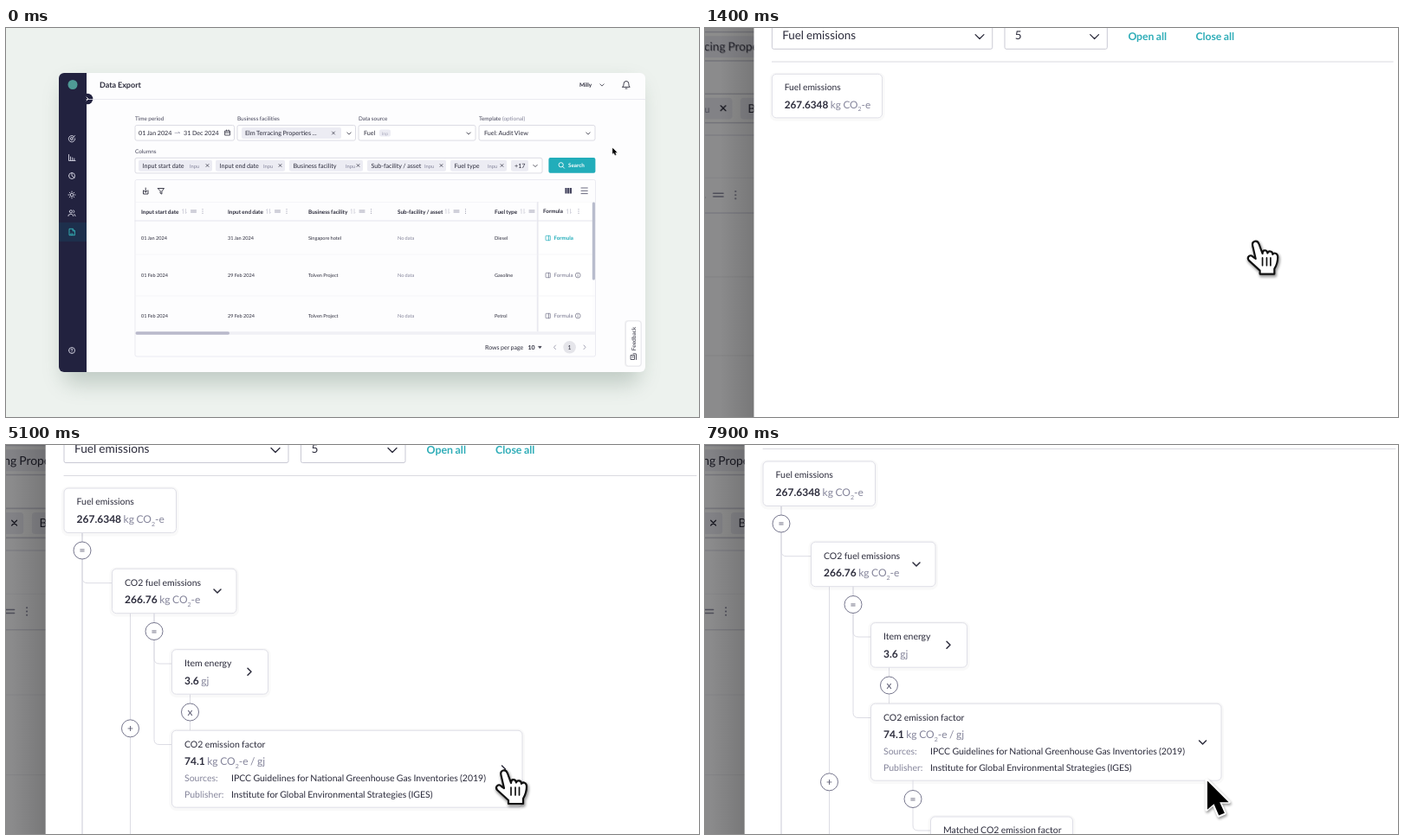
An HTML page that plays this animation: 800x450 px, repeating every 8 s.

```html
<!DOCTYPE html>
<html lang="en">
<head>
<meta charset="utf-8">
<title>Data export walkthrough</title>
<style>
html, body { margin: 0; width: 100%; height: 100%; overflow: hidden; background: #edf2ee }
svg { display: block; width: 800px; height: 450px; font-family: Lato, "Open Sans", sans-serif; text-rendering: geometricPrecision }
text { white-space: pre; word-spacing: -.04em }
</style>
</head>
<body>
<svg id="stage" viewBox="0 0 800 450"></svg>
<script>
const NAVY = '#22223f', INK = '#2c2c3c', GREY = '#85859b', PALE = '#dcdce4', TEAL = '#22adba';
const LOOP = 8000, ZOOM = 1.93, FOCUS = [646.5, 233];

// ---- drawing helpers, each returns markup ----
const text = (x, y, size, str, fill = INK, more = '') =>
  `<text x="${x}" y="${y}" font-size="${size}" fill="${fill}" ${more}>${str}</text>`;
const bold = (x, y, size, str, fill = INK, more = '') => text(x, y, size, str, fill, 'font-weight="700" ' + more);
const rect = (x, y, w, h, r, fill, stroke = 'none', more = '') =>
  `<rect x="${x}" y="${y}" width="${w}" height="${h}" rx="${r}" fill="${fill}" stroke="${stroke}" ${more}/>`;
const path = (d, stroke, w = 1, fill = 'none', more = '') =>
  `<path d="${d}" fill="${fill}" stroke="${stroke}" stroke-width="${w}" stroke-linecap="round" stroke-linejoin="round" ${more}/>`;
const circle = (x, y, r, fill, stroke = 'none', w = 1) =>
  `<circle cx="${x}" cy="${y}" r="${r}" fill="${fill}" stroke="${stroke}" stroke-width="${w}"/>`;
const group = (body, transform = '', opacity = 1) => `<g transform="${transform}" opacity="${opacity}">${body}</g>`;
const at = (x, y, body) => group(body, `translate(${x} ${y})`);
const middle = 'text-anchor="middle"';
const down = (x, y, s = 2.2, w = .8) => path(`M${x - s} ${y - s / 2}l${s} ${s}l${s} ${-s}`, INK, w);
const cross = (x, y) => path(`M${x - 1.5} ${y - 1.5}l3 3m0-3l-3 3`, INK, .7);

// ---- page behind the panel ----
function sidebar() {
  const icon = (y, d, colour = '#d9d9e6') => at(76, y, path(d, colour, .9));
  const ring = 'M-3.5 0a3.5 3.5 0 1 0 7 0a3.5 3.5 0 1 0 -7 0';
  return path('M93 52H67a6 6 0 0 0-6 6V392a6 6 0 0 0 6 6H93Z', 'none', 0, NAVY) +
    rect(61, 225, 32, 22, 0, '#1d2f4c') + circle(77, 65.5, 5.5, '#4f9a96') +
    circle(94, 82, 6.3, NAVY) + path('M93 80l2 2l-2 2', '#fff', .9) +
    icon(128, 'M3 -2a3.7 3.7 0 1 0 .7 2M1.6 0a1.6 1.6 0 1 1-1.6-1.6M0 0L3.5-3.5') +
    icon(150, 'M-3.5-3.5V3.5H4M-1.5 3V-1M.7 3V0M2.8 3V1') +
    icon(171, ring + 'M0-3.5V0L3 2') +
    icon(193, 'M-1.8 0a1.8 1.8 0 1 0 3.6 0a1.8 1.8 0 1 0-3.6 0M0-4v1M0 3v1M-4 0h1M3 0h1M-2.8-2.8l.6.6M2.2 2.2l.6.6M2.8-2.8l-.6.6M-2.2 2.2l-.6.6') +
    icon(214, 'M-2.7-1.7a1.6 1.6 0 1 0 3.2 0a1.6 1.6 0 1 0-3.2 0M-4 3.5V2.4Q-1-.2 1.6 2.4V3.5M2-3.3q2 1.6 0 3.2M3 1.5l1 2') +
    icon(236, 'M1-3.7H-3V3.7H3.4V-1.2L1-3.7V-1.2H3.4M-1 1.6a1.2 1.2 0 1 0 2 0', '#36b9bd') +
    icon(373, ring + 'M-1-1q.2-1 1.1-.9q1.2.4.5 1.3q-.6.3-.6 1M0 1.9v.1');
}

function filters() {
  const box = (x, w, y = 112.5) => rect(x, y, w, 17.6, 2, '#fff', '#d3d3de', 'stroke-width=".8"');
  const chip = (x, w, y) => rect(x, y, w, 13, 2, '#ececf3');
  const label = (x, y, s) => text(x, y, 6.4, s, '#45455a');
  const columns = [[153, 85, 'Input start date', 212], [242, 80, 'Input end date', 297], [327, 85, 'Business facility', 392],
    [417, 91, 'Sub-facility / asset', 483], [513, 65, 'Fuel type', 556]];
  return label(149, 107, 'Time period') + label(267, 107, 'Business facilities') + label(407, 107, 'Data source') +
    label(546, 107, `Template <tspan fill="${GREY}">(optional)</tspan>`) + label(149, 145, 'Columns') +
    box(149, 114.5) + text(153, 124, 7.2, '01 Jan 2024') + path('M195 121.3h5.5m-1.5-1.2l1.5 1.2', GREY, .6) +
    text(205, 124, 7.2, '31 Dec 2024') + path('M253 119h5.5v5h-5.5zM253 121h5.5M254.5 118v1M257 118v1', INK, .8) +
    box(267, 136.5) + chip(272, 115, 115) + text(276, 124, 7.2, 'Elm Terracing Properties ...') + cross(378, 121.5) + down(396, 122) +
    box(407, 135) + text(413, 124, 7.2, 'Fuel') + rect(431, 117.5, 13, 8, 2, '#ececf3') + text(434, 123.5, 5, 'Inp', '#a5a5b8') + down(534, 122) +
    box(546, 134) + text(552, 124, 7.2, 'Fuel: Audit View') + down(672, 122) +
    box(149, 470, 150.3) +
    columns.map(([x, w, name, tag]) => chip(x, w, 152.7) + text(x + 4.5, 161.6, 7.2, name) +
      text(tag, 161.6, 5.8, 'Inpu', GREY) + cross(x + w - 5.5, 159)).join('') +
    chip(583, 20, 152.7) + text(587, 161.6, 7.2, '+17') + down(611, 159.5) +
    rect(626.4, 150, 54, 17.8, 2, TEAL) + circle(640.7, 158.3, 2.6, 'none', '#fff', .9) +
    path('M642.7 160.4l1.8 1.8', '#fff', .9) + bold(649, 161.2, 6.3, 'Search', '#fff');
}

function table() {
  const tools = (x, bars = true) => path(`M${x - 1.5} 214.5v-5l-1 1m4-1v5l1-1`, '#c4c4d2', .7) +
    (bars ? path(`M${x + 7.5} 211h6m-6 2h6`, '#8d8da2', .8) : '') +
    [209.8, 212, 214.2].map(y => circle(x + (bars ? 21 : 11), y, .55, '#8d8da2')).join('');
  const heads = [[156, 'Input start date', 206], [256, 'Input end date', 303], [349, 'Business facility', 400.5],
    [452, 'Sub-facility / asset', 509.5], [564, 'Fuel type', 596.5]];
  const rows = [[243, '01 Jan 2024', '31 Jan 2024', 'Singapore hotel', 'Diesel'],
    [286, '01 Feb 2024', '29 Feb 2024', 'Tolven Project', 'Gasoline'],
    [333, '01 Feb 2024', '29 Feb 2024', 'Tolven Project', 'Petrol']];
  const cell = (x, y, s, c) => text(x, y + 2, 5.6, s, c);
  return rect(149, 175.5, 531.5, 204.5, 2, 'none', '#e6e6ee', 'stroke-width=".8"') +
    path('M158.5 188v4h5.5v-4M161.2 185v5l-1.8-1.7m1.8 1.7l1.8-1.7', INK, .9) +
    path('M175.5 185.5h7l-2.6 3.4v3.2l-1.8-1v-2.2Z', INK, .9) +
    [645.4, 648.1, 650.8].map(x => rect(x, 185, 2.2, 6.5, 0, '#45455f')).join('') +
    path('M664 185h7.3M664 188.3h7.3M664 191.6h7.3', '#45455f', .8) +
    path('M149 201.5H680', '#f0f0f5', .6) + path('M149 223H680', '#dedee8', .8) +
    path('M149 262H680M149 310H680', '#f0f0f4', .6) +
    heads.map(([x, s, tx]) => bold(x, 214.5, 6.4, s) + tools(tx)).join('') +
    rows.map(([y, a, b, c, d]) => cell(156, y, a) + cell(256, y, b) + cell(349, y, c) +
      cell(452, y, 'No data', GREY) + cell(564, y, d)).join('') +
    rect(612.6, 201.5, 1.4, 149.5, 0, '#f3f3f7') + rect(614, 201.5, 63, 149.5, 0, '#fff') +
    path('M614 201.5V351', '#d8d8e2', .7) + path('M614 223H677', '#dedee8', .8) + path('M614 262H677M614 310H677', '#f0f0f4', .6) +
    bold(620, 214, 6.3, 'Formula') + tools(650, false) +
    rows.map(([y], i) => {
      const c = i ? '#74748c' : TEAL;
      return rect(623, y - 2.7, 5.4, 5.4, .6, 'none', c, 'stroke-width=".7"') + path(`M626.5 ${y - 2.7}v5.4`, c, .7) +
        text(632.5, y + 2.2, 6.2, 'Formula', c, i ? '' : 'font-weight="700"') +
        (i ? circle(660.2, y, 2.9, 'none', '#55556c', .6) + path(`M660.2 ${y - .2}v1.6m0-3v.1`, '#55556c', .6) : '');
    }).join('') +
    rect(676.8, 201.5, 3.2, 90, 1.5, '#b9bdcd') + rect(149.5, 351.3, 530.5, 3.4, 0, '#f0f0f5') +
    rect(149.5, 351.3, 108.5, 3.4, 1.6, '#b9b9cb') +
    text(553, 371.7, 7, 'Rows per page') + bold(602.5, 371.7, 7, '10') + path('M614.6 368.3h3.6l-1.8 2.2Z', INK, .4, INK) +
    path('M634.5 367l-2 2.3l2 2.3', '#8d8da2', .8) + circle(650.6, 369.3, 7.3, '#e5e5ea') +
    text(650.6, 371.8, 7, '1', INK, middle) + path('M667 367l2 2.3l-2 2.3', '#8d8da2', .8);
}

function page() {
  return rect(-400, -300, 1600, 1100, 0, '#edf2ee') +
    rect(66, 64, 666, 348, 12, '#5b7467', 'none', 'filter="url(#soft)" opacity=".3"') +
    rect(61, 52, 677, 346, 6, '#fdfdfe') + sidebar() +
    bold(108, 69, 9, 'Data Export') + bold(662, 68, 6.4, 'Milly') + down(688, 66) +
    path('M711.8 68.3h8.4q-1.4-1-1.4-4a2.8 2.8 0 0 0-5.6 0q0 3-1.4 4M715 70h2', INK, .9) +
    path('M93 82.5H738', '#e6e6ee', .8) + filters() + table() +
    rect(714, 338, 20, 54, 4, '#000', 'none', 'opacity=".05"') + rect(715.5, 339, 17.5, 52, 3, '#fff', '#e2e2ea', 'stroke-width=".7"') +
    text(0, 0, 6.6, 'Feedback', INK, middle + ' transform="translate(726.5 359.5) rotate(-90)"') +
    path('M721.5 378.5h4v5h-4zM727.5 377.5v6M723 380.5h1M724 376.8h3', INK, .8);
}

// ---- formula panel, laid out at full zoom ----
const kg = 'kg CO<tspan font-size="7" dy="4">2</tspan><tspan dy="-4">-e</tspan>';

function card(x, y, w, title, value, unit, h = 51.5) {
  return rect(x - 1, y, w + 2, h + 2, 6, 'none', '#000', 'stroke-width="4" opacity=".025"') +
    rect(x, y, w, h, 5, '#fff', '#dedee6') + text(x + 14.5, y + 19.3, 10.5, title) +
    text(x + 14.5, y + 40, 12, `<tspan font-weight="700" fill="${INK}">${value}</tspan><tspan dx="2.5">${unit}</tspan>`, GREY);
}
const chevron = (x, y, open) => group(path('M-2 -4l4 4l-4 4', INK, 1.5), `translate(${x} ${y}) rotate(${90 * open})`);
const sign = (x, y, s) => circle(x, y, 10, '#fff', '#77778e', 1) + text(x, y + 4, 12, s, '#55556c', middle);
const branch = (x, y0, y, x1, c) => path(`M${x} ${y0}V${y - 6}q0 6 6 6H${x1}`, c, 1);

function tree(t) {
  const first = ramp(t, 1700, 2050), second = ramp(t, 3250, 3600), third = ramp(t, 5200, 5550);
  const scroll = 31 * ramp(t, 6200, 6700);
  const lineA = t > 3050 && t < 4050 ? '#4a4a60' : PALE;
  const lineB = t > 4250 && t < 6350 ? '#4a4a60' : PALE;
  const ch4 = 236.7 + 224 * second + 186 * third, n2o = ch4 + 93.5;
  const select = (x, w, s) => rect(x, -13, w, 33.5, 2, '#fff', '#c9c9d4') + text(x + 12, 8.5, 13.7, s) + down(x + w - 15, 6, 5, 1.3);

  const factor = branch(240, 419, 477, 260, lineB) + sign(240, 440.5, '=') +
    card(260.5, 461, 164, 'Matched CO2 emission factor', '74,100', kg + ' / tj');
  const energy = branch(171, 195, 253, 191, lineA) + branch(171, 195, 346.5, 191, lineA) + sign(171, 215.5, '=') +
    path('M212.5 288V330', PALE) + sign(212.5, 309, 'x') +
    card(191.5, 236.7, 111, 'Item energy', '3.6', 'gj') + chevron(281, 262.3, 0) +
    card(191.5, 330.2, 404.5, 'CO2 emission factor', '74.1', kg + ' / gj', 89) +
    text(206, 389, 10.5, 'Sources:', GREY) + text(260, 389, 10.5, 'IPCC Guidelines for National Greenhouse Gas Inventories (2019)') +
    text(206, 408.3, 10.5, 'Publisher:', GREY) + text(260, 408.3, 10.5, 'Institute for Global Environmental Strategies (IGES)') +
    chevron(574.5, 375, third);
  const gases = [143.2, ch4, n2o].map(y => branch(88, 101, y + 16.5, 122, PALE)).join('') +
    path(`M143.5 195V${n2o}`, PALE) + sign(88, 122, '=') +
    sign(143.5, (195 + ch4) / 2, '+') + sign(143.5, ch4 + 72.5, '+') +
    card(122.5, 143.2, 143.5, 'CO2 fuel emissions', '266.76', kg) + chevron(244, 169, second) +
    card(122.5, ch4, 143.5, 'CH4 fuel emissions', '0.3024', kg) + chevron(244, ch4 + 25.6, 0) +
    card(122.5, n2o, 144, 'N2O fuel emissions', '0.5724', kg) + chevron(245, n2o + 25.6, 0);

  return rect(5.7, -200, 40, 900, 0, 'url(#edge)') + rect(45.7, -200, 900, 900, 0, '#fff') +
    at(0, -scroll, select(67, 259, 'Fuel emissions') + select(340.5, 120.5, '5') +
      bold(485.5, 10, 12.4, 'Open all', '#2fadb8') + bold(565, 10, 12.4, 'Close all', '#2fadb8') +
      path('M67 35.5H797', '#dadae0') +
      group(gases, '', first) + group(energy, '', second) + group(factor, '', third) +
      card(67, 50, 129.5, 'Fuel emissions', '267.6348', kg));
}

// ---- motion ----
const clamp = v => Math.max(0, Math.min(1, v));
const smooth = u => u * u * (3 - 2 * u);
const ramp = (t, a, b) => smooth(clamp((t - a) / (b - a)));

// critically damped spring towards the clicked link
function zoom(t) {
  const w = 5.8 * Math.max(0, t - 522) / 1000;
  return 1 + (ZOOM - 1) * (1 - (1 + w) * Math.exp(-w));
}
const camera = s => `translate(${FOCUS[0] * (1 - s)} ${FOCUS[1] * (1 - s)}) scale(${s})`;
const close = camera(1 / ZOOM);

const stops = [[0, 750, 51], [100, 750, 51], [900, 763, 148], [1120, 635.5, 247.5], [2750, 635.5, 247.5], [3150, 252, 168],
  [4000, 252, 168], [4300, 572, 371], [5000, 572, 371], [5150, 576, 379], [6150, 576, 379], [6400, 579, 387], [LOOP, 579, 387]];

function pointer(t) {
  const i = stops.findIndex(s => s[0] > t), a = stops[i - 1], b = stops[i], u = ramp(t, a[0], b[0]);
  const x = a[1] + (b[1] - a[1]) * u, y = a[2] + (b[2] - a[2]) * u;
  const overLink = t > 1080 && t < 2850 || t > 3050 && t < 4050 || t > 4230 && t < 6350;
  const arrow = 'M0 0V35L8 28L14 42L21 39L15 26H26Z';
  const hand = 'M-3.5 5C-5 -1 2 -3 4 3L8 14C8 9 13 9 14 13.5C15 10 20 11 20 15C22 12 26 14 26 18C26 24 25 27 22 32V38H5V34L-8 22C-11 18 -6 14 -3 18L0 20Z';
  const shade = d => path(d, '#000', 3.5, '#000', 'opacity=".4" transform="translate(1 2)" filter="url(#blur)"');
  const body = overLink ? shade(hand) + path(hand, '#111', 2.2, '#fff') + path('M8 19v9M13 19v9M17.5 19v9', '#111', 1.7)
    : shade(arrow) + path(arrow, '#fff', 3.4, '#000') + path(arrow, 'none', 0, '#000', 'transform="translate(.9 1.6) scale(.95)"');
  return group(body, `translate(${x} ${y}) scale(${.38 + .62 * ramp(t, 100, 600)})`);
}

// ---- scene ----
const SAMPLES = 6;
const stage = document.getElementById('stage');
stage.innerHTML = `<defs><filter id="soft" x="-20%" y="-20%" width="140%" height="140%"><feGaussianBlur stdDeviation="12"/></filter>
  <filter id="blur" x="-40%" y="-40%" width="180%" height="180%"><feGaussianBlur stdDeviation="1.5"/></filter>
  <linearGradient id="edge"><stop stop-opacity="0"/><stop offset="1" stop-opacity=".14"/></linearGradient>
  <clipPath id="frame">${rect(61, 52, 677, 346, 6, '#000')}</clipPath><g id="page">${page()}</g></defs>` +
  Array.from({ length: SAMPLES }, (_, k) => `<use class="page" href="#page" opacity="${1 / (k + 1)}"/>`).join('') +
  '<g id="world"></g>';
const layers = [...stage.querySelectorAll('.page')], world = document.getElementById('world');

function draw() {
  const t = performance.now() % LOOP, s = zoom(t);
  // averaged copies of the page give the zoom its motion blur
  const moving = zoom(t + 20) - zoom(t - 20) > .004;
  layers.forEach((layer, k) => {
    layer.style.display = k && !moving ? 'none' : '';
    layer.setAttribute('transform', camera(moving ? zoom(t + (k - (SAMPLES - 1) / 2) * 4) : s));
  });
  const slide = 1 - (1 - clamp((t - 1120) / 270)) ** 3;
  world.setAttribute('transform', camera(s));
  world.innerHTML = (slide ? `<g clip-path="url(#frame)">${rect(61, 52, 677, 346, 0, '#000', 'none', `opacity="${.45 * slide}"`)}` +
    group(at(790 * (1 - slide), 0, tree(t)), close) + '</g>' : '') + group(pointer(t), close);
  requestAnimationFrame(draw);
}
draw();
</script>
</body>
</html>
```
